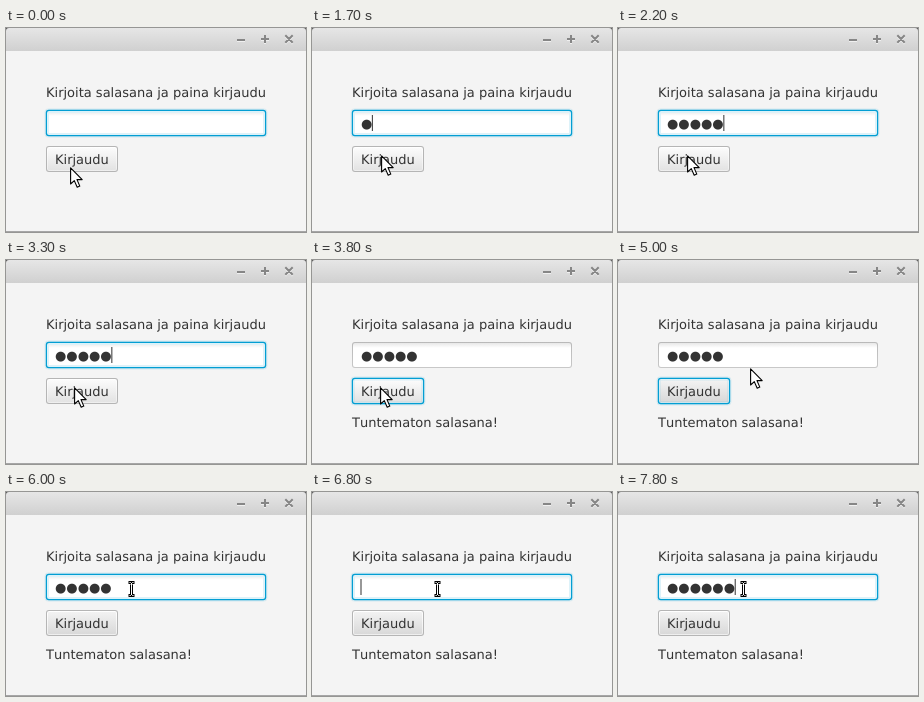
Recreate the animation shown at these times as an HTML page. Size 300 by 204 pixels, loop 8000 ms.

```html
<!DOCTYPE html>
<html lang="fi">
<head>
<meta charset="utf-8">
<title>Kirjaudu</title>
<style>
  html, body { margin: 0; width: 100%; height: 100%; overflow: hidden; background: #f4f4f4; }
  svg { display: block; width: 100vw; height: 100vh; }
  text { font: 13px "DejaVu Sans", sans-serif; font-kerning: none; font-variant-ligatures: none; fill: #333; text-rendering: geometricPrecision; }
</style>
</head>
<body>
<svg viewBox="0 0 300 204">
  <defs>
    <linearGradient id="bar" x2="0" y2="1"><stop stop-color="#e6e6e6"/><stop offset="1" stop-color="#d0d0d0"/></linearGradient>
    <linearGradient id="inset" gradientUnits="userSpaceOnUse" x1="0" y1="83" x2="0" y2="88"><stop stop-color="#e8e8e8"/><stop offset="1" stop-color="#fff"/></linearGradient>
    <linearGradient id="fieldEdge" x2="0" y2="1"><stop stop-color="#b9b9b9"/><stop offset="1" stop-color="#c8c8c8"/></linearGradient>
    <linearGradient id="rim" x2="0" y2="1"><stop stop-color="#fff"/><stop offset="1" stop-color="#eee"/></linearGradient>
    <linearGradient id="plain" x2="0" y2="1"><stop stop-color="#f2f2f2"/><stop offset="1" stop-color="#d9d9d9"/></linearGradient>
    <linearGradient id="hover" x2="0" y2="1"><stop stop-color="#fbfbfb"/><stop offset="1" stop-color="#e3e3e3"/></linearGradient>
    <linearGradient id="pressed" x2="0" y2="1"><stop stop-color="#e8e8e8"/><stop offset="1" stop-color="#ccc"/></linearGradient>
    <path id="glyphs" d="M231 12H239M255 11H263M259 7V15M279.3 7.3L286.7 14.7M286.7 7.3L279.3 14.7"/>
    <path id="bar-cursor" d="M-1.5 -6.5H-1L0 -5.5L1 -6.5H1.5M0 -5.5V5.5M-1.5 6.5H-1L0 5.5L1 6.5H1.5"/>
  </defs>

  <rect width="300" height="204" fill="#f4f4f4"/>
  <rect width="300" height="23" fill="url(#bar)"/>
  <path d="M0 203.5H300" stroke="#a6a6a6"/>
  <path d="M0 0H3Q0 0 0 3Z M300 0H297Q300 0 300 3Z" fill="#555"/>
  <g fill="none" stroke-width="2">
    <use href="#glyphs" y="1" stroke="#f0f0f0"/>
    <use href="#glyphs" stroke="#868686"/>
  </g>

  <text x="40" y="69">Kirjoita salasana ja paina kirjaudu</text>
  <g id="field"></g>
  <text id="dots" x="49" y="100"></text>
  <rect id="caret" y="87" width="1" height="16" fill="#333"/>
  <g id="button"></g>
  <text x="49" y="136">Kirjaudu</text>
  <text id="message" x="40" y="167">Tuntematon salasana!</text>

  <path id="arrow" d="M.6 .9V17L4.3 13.6L7.2 20.2L9.8 19.1L7 12.6H12.2Z" fill="#fff" stroke="#000" stroke-width="1.1" stroke-linejoin="round"/>
  <g id="beam" fill="none" stroke-linecap="square">
    <use href="#bar-cursor" stroke="#000" stroke-width="3"/>
    <use href="#bar-cursor" stroke="#fff"/>
  </g>
</svg>
<script>
const LOOP = 8000, STEP = 100, DOT = 13 * 1791 / 2048, BLUE = '#039ed3';
const PRESS = 3700, RELEASE = 3800, REFOCUS = 5500, OVER_FIELD = 5200;
const GLIDE = { from: 4300, to: 5000, path: [[67, 128], [85, 138], [132, 108]] };

const $ = id => document.getElementById(id);
const show = (id, on) => $(id).setAttribute('visibility', on ? 'visible' : 'hidden');

// Evenly paced key presses, each shown on the nearest step
const run = (start, gap, n, change) => Array.from({ length: n }, (_, i) =>
  ({ time: Math.round((start + i * gap) / STEP) * STEP, change }));
const keys = [...run(1700, 130, 5, 1), ...run(6240, 130, 5, -1), ...run(7100, 100, 2, 1), ...run(7500, 100, 4, 1)];

// Places where the pointer rests: time, x, y
const rests = [[0, 64, 139], [100, 68, 131], [400, 69, 127], [3100, 68, 127], [4200, 67, 128],
  [5200, 127.5, 99], [5300, 125.5, 97]];

function pointer(t) {
  const u = Math.min(1, (t - GLIDE.from) / (GLIDE.to - GLIDE.from));
  if (u < 0 || t >= OVER_FIELD) return rests.findLast(r => r[0] <= t).slice(1);
  const [a, b, c] = GLIDE.path;
  return a.map((p, i) => Math.round((1 - u) ** 2 * p + 2 * u * (1 - u) * b[i] + u * u * c[i]));
}

// The caret blinks, starting over on focus and on every key
function caretOn(t) {
  const resets = [400, REFOCUS, ...keys.map(k => k.time)].filter(r => r <= t);
  return resets.length > 0 && Math.floor((t - Math.max(...resets)) / 500) % 2 === 0;
}

// Nested rounded boxes: inset, radius, fill, opacity
const layers = (x, y, w, h, list) => list.map(([i, r, fill, o = 1]) =>
  `<rect x="${x + i}" y="${y + i}" width="${w - 2 * i}" height="${h - 2 * i}" rx="${r}" fill="${fill}" opacity="${o}"/>`).join('');

function drawField(focus) {
  $('field').innerHTML = layers(40, 82, 220, 26, focus
    ? [[-.2, 3, BLUE], [1, 2, '#fff'], [-1.4, 4, BLUE, .133], [3, 0, 'url(#inset)']]
    : [[0, 3, 'url(#fieldEdge)'], [1, 2, 'url(#inset)']]);
}

function drawButton(focus, state) {
  const body = `url(#${state})`, rim = 'url(#rim)';
  $('button').innerHTML = layers(40, 118, 72, 26, focus
    ? [[-.2, 3, BLUE], [1, 2, rim], [2, 1, body], [-1.4, 4, BLUE, .133], [2.6, 1, body]]
    : [[0, 3, '#b5b5b5'], [1, 2, rim], [2, 1, body]]);
}

function draw(time) {
  const t = Math.floor(time / STEP) * STEP;
  const count = keys.reduce((n, k) => n + (k.time <= t ? k.change : 0), 0);
  const [x, y] = pointer(t);
  const onButton = t >= PRESS && t < REFOCUS;
  const over = x >= 40 && x < 112 && y >= 118 && y < 144;
  const beam = t >= OVER_FIELD;

  drawField(!onButton);
  drawButton(onButton, t >= PRESS && t < RELEASE ? 'pressed' : over ? 'hover' : 'plain');
  $('dots').textContent = '●'.repeat(count);
  $('caret').setAttribute('x', 48.5 + count * DOT);
  show('caret', !onButton && caretOn(t));
  show('message', t >= RELEASE);
  show('arrow', !beam);
  show('beam', beam);
  $(beam ? 'beam' : 'arrow').setAttribute('transform', `translate(${x} ${y})`);
}

const start = performance.now();
function tick() {
  draw((performance.now() - start) % LOOP);
  requestAnimationFrame(tick);
}
draw(0);
requestAnimationFrame(tick);
</script>
</body>
</html>
```
